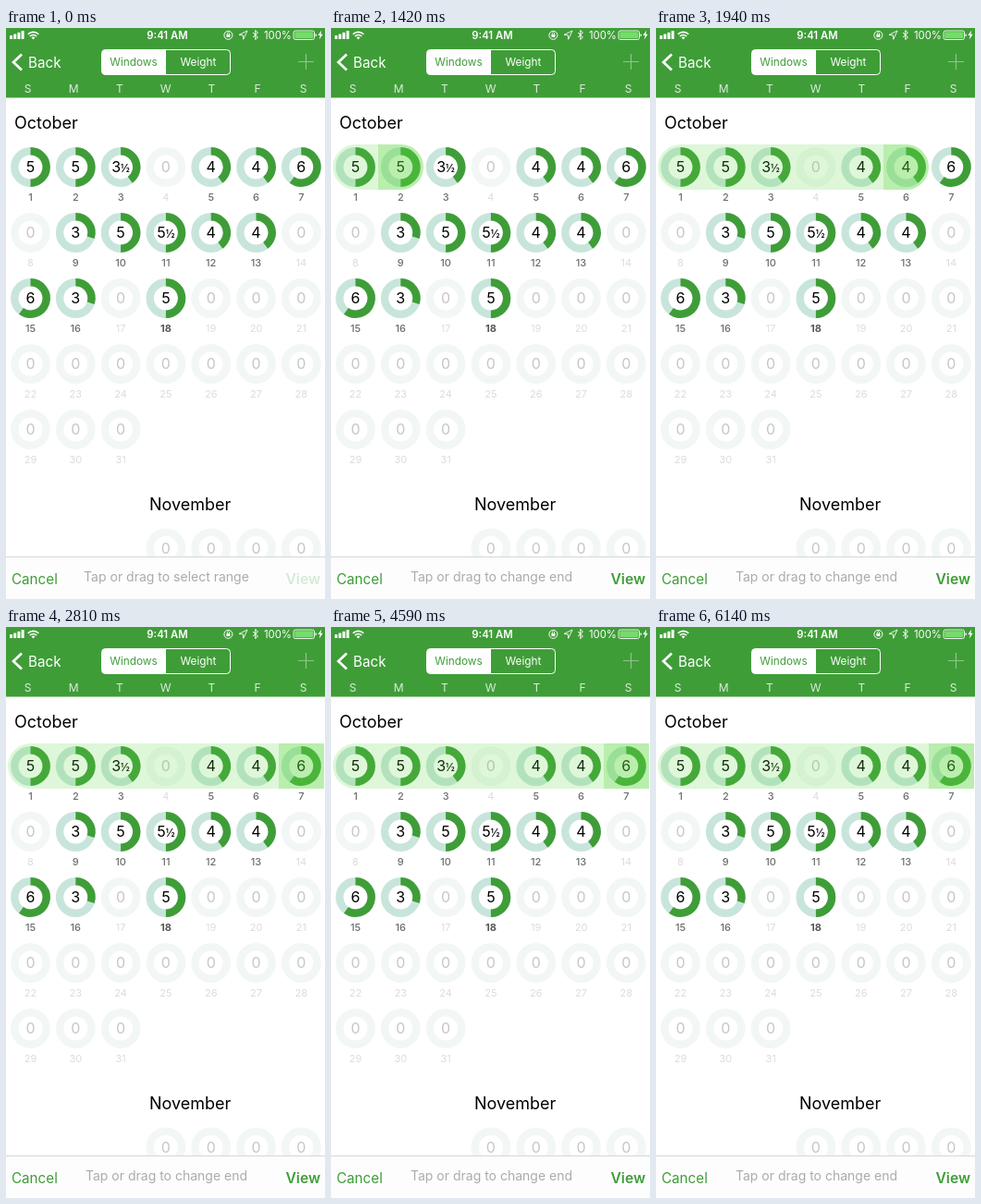
Animation of 345x618 px, one loop 6.24 s. Source, as an HTML page:

```html
<!DOCTYPE html>
<html lang="en">
<head>
<meta charset="utf-8">
<title>Calendar range selection</title>
<style>
  html, body { margin: 0; width: 100%; height: 100%; overflow: hidden; background: #fff; }
  svg { display: block; width: 100vw; height: 100vh; font-family: Inter, Roboto, sans-serif; }
</style>
</head>
<body>
<svg id="stage" viewBox="0 0 345 618">
  <rect width="345" height="618" fill="#fff"/>
  <g id="days"></g>
  <path id="range" fill="#5ad73c" fill-opacity=".2"/>
  <path id="tip" fill="#5ad73c" fill-opacity=".42"/>
  <g font-size="18" fill="#000">
    <text x="9" y="109">October</text>
    <text x="155" y="522">November</text>
  </g>

  <g id="header">
    <rect width="345" height="75.5" fill="#3f9d38"/>
    <g fill="#fff">
      <rect x="4" y="8" width="3" height="4" rx=".6"/>
      <rect x="8.2" y="6.5" width="3" height="5.5" rx=".6"/>
      <rect x="12.4" y="4.8" width="3" height="7.2" rx=".6"/>
      <rect x="16.6" y="3" width="3" height="9" rx=".6"/>
      <path d="M29.5 12.5l-2-2.2a3 3 0 0 1 4 0z"/>
      <text x="174.5" y="11.5" font-size="11.3" font-weight="600" text-anchor="middle">9:41 AM</text>
      <text x="279" y="11.5" font-size="11.3">100%</text>
      <path d="M261 3l-9 4.4 4.4.5.3 4.4z" fill="none" stroke="#fff" stroke-width=".9"/>
      <path d="M341.3 2.5l-4 5.6h2.4l-1 4.4 4-5.8h-2.4z"/>
      <path d="M334.5 6v3.4q1.4-.5 1.4-1.7t-1.4-1.7z"/>
      <rect x="238.4" y="7" width="4" height="3" rx=".4"/>
    </g>
    <g fill="none" stroke="#fff">
      <path d="M23.7 6.8a8.2 8.2 0 0 1 11.6 0M25.8 9a5.2 5.2 0 0 1 7.4 0" stroke-width="1.6"/>
      <circle cx="240.4" cy="7.8" r="4.5" stroke-width="1"/>
      <path d="M239.2 7V6a1.2 1.2 0 0 1 2.4 0v1" stroke-width=".8"/>
      <path d="M267 5l5.4 5-2.7 2.5V2.5l2.7 2.5-5.4 5" stroke-width="1"/>
      <rect x="311" y="3" width="22.5" height="9.5" rx="2" stroke-width=".9"/>
      <path d="M17 28.5L8 37l9 8.500" stroke-width="2.7"/>
      <path d="M316 36.500h17M324.500 28v17" stroke-width="1.2" stroke-opacity=".42"/>
    </g>
    <rect x="312.300" y="4.300" width="20" height="7" rx="1" fill="#74dc6a"/>
    <text x="24" y="42.500" font-size="15.200" fill="#fff">Back</text>
    <rect x="103.500" y="23.500" width="139" height="27" rx="4" fill="none" stroke="#fff"/>
    <path d="M173 23.500h-65.500a4 4 0 0 0-4 4v19a4 4 0 0 0 4 4H173z" fill="#fff"/>
    <g font-size="11.800" text-anchor="middle">
      <text x="138" y="41.300" fill="#3f9d38">Windows</text>
      <text x="208" y="41.300" fill="#fff">Weight</text>
    </g>
    <g id="weekdays" font-size="12" fill="#fff" fill-opacity=".82" text-anchor="middle"></g>
  </g>

  <rect y="572" width="345" height="46" fill="#fdfdfd"/>
  <rect y="572" width="345" height="1" fill="#d2d8d4"/>
  <text x="6" y="601.500" font-size="15.200" fill="#3f9d38">Cancel</text>
  <text id="hint" x="173.500" y="599.300" font-size="14" fill="#ababab" text-anchor="middle"></text>
  <text id="view" x="340" y="601.500" font-size="15.600" font-weight="600" text-anchor="end">View</text>
</svg>
<script>
const LOOP = 6240;
const PITCH = 48.8;
// Time at which the drag reaches each day, starting with day 1.
const REACHED = [1150, 1410, 1590, 1680, 1770, 1930, 2110];
const HOURS = { 1: 5, 2: 5, 3: 3.5, 5: 4, 6: 4, 7: 6, 9: 3, 10: 5, 11: 5.5, 12: 4, 13: 4, 15: 6, 16: 3, 18: 5 };
const SHARE = { 3: .3, 3.5: .4, 4: .4, 5: .5, 5.5: .5, 6: .6 };
const R = 17.2;

const $ = id => document.getElementById(id);

function add(parent, tag, attrs, text) {
  const el = document.createElementNS("http://www.w3.org/2000/svg", tag);
  for (const key in attrs) el.setAttribute(key, attrs[key]);
  if (text !== undefined) el.textContent = text;
  parent.appendChild(el);
  return el;
}

function arc(x, y, share) {
  const a = share * 2 * Math.PI;
  const end = `${x + R * Math.sin(a)} ${y - R * Math.cos(a)}`;
  return `M${x} ${y - R}A${R} ${R} 0 ${share > .5 ? 1 : 0} 1 ${end}`;
}

function drawDay(col, y, day, hours) {
  const x = 26.5 + col * PITCH;
  const g = $("days");
  const ring = { fill: "none", "stroke-width": 8.4 };
  add(g, "circle", { cx: x, cy: y, r: R, stroke: hours ? "#c8e5db" : "#f2f7f5", ...ring });
  if (hours) add(g, "path", { d: arc(x, y, SHARE[hours]), stroke: "#3f9d38", ...ring });

  const value = add(g, "text", {
    x, y: y + 5.8, "font-size": 16, "text-anchor": "middle", fill: hours ? "#000" : "#c6c6c6"
  }, Math.floor(hours));
  if (hours % 1) add(value, "tspan", { "font-size": 11.5, "font-weight": 500 }, "½");

  const today = day === 18;
  add(g, "text", {
    x, y: y + 36, "font-size": 11, "text-anchor": "middle",
    "font-weight": today ? 700 : hours ? 500 : 400,
    fill: today ? "#555" : hours ? "#6c6c6c" : "#dcdcdc"
  }, day);
}

for (let day = 1; day <= 31; day++) {
  const i = day - 1;
  drawDay(i % 7, 150.5 + Math.floor(i / 7) * 71, day, HOURS[day] || 0);
}
for (let col = 3; col < 7; col++) drawDay(col, 563, col - 2, 0);
[..."SMTWTFS"].forEach((letter, i) =>
  add($("weekdays"), "text", { x: 23.5 + i * 49.7, y: 70 }, letter));

// Horizontal band across one row, with optional round ends.
function band(x0, x1, roundLeft, roundRight) {
  const top = 126, bottom = 175, r = 24.5;
  const cap = (up, y) => `A${r} ${r} 0 0 1 ${up} ${y}`;
  return `M${roundLeft ? x0 + r : x0} ${top}H${roundRight ? x1 - r : x1}` +
    (roundRight ? cap(x1 - r, bottom) : `V${bottom}`) +
    `H${roundLeft ? x0 + r : x0}` +
    (roundLeft ? cap(x0 + r, top) : "") + "Z";
}

const edge = i => Math.round(2.1 + i * PITCH);

function render(t) {
  const count = REACHED.filter(at => t >= at).length;
  const last = count - 1;
  $("range").setAttribute("d", last > 0 ? band(edge(0), edge(last), true, false) : "");
  $("tip").setAttribute("d", count ? band(edge(last), edge(count), last === 0, last < 6) : "");
  $("hint").textContent = count ? "Tap or drag to change end" : "Tap or drag to select range";
  $("view").setAttribute("fill", count ? "#3f9d38" : "#d5ead6");
}

const start = performance.now();
function tick() {
  render((performance.now() - start) % LOOP);
  requestAnimationFrame(tick);
}
tick();
</script>
</body>
</html>
```
